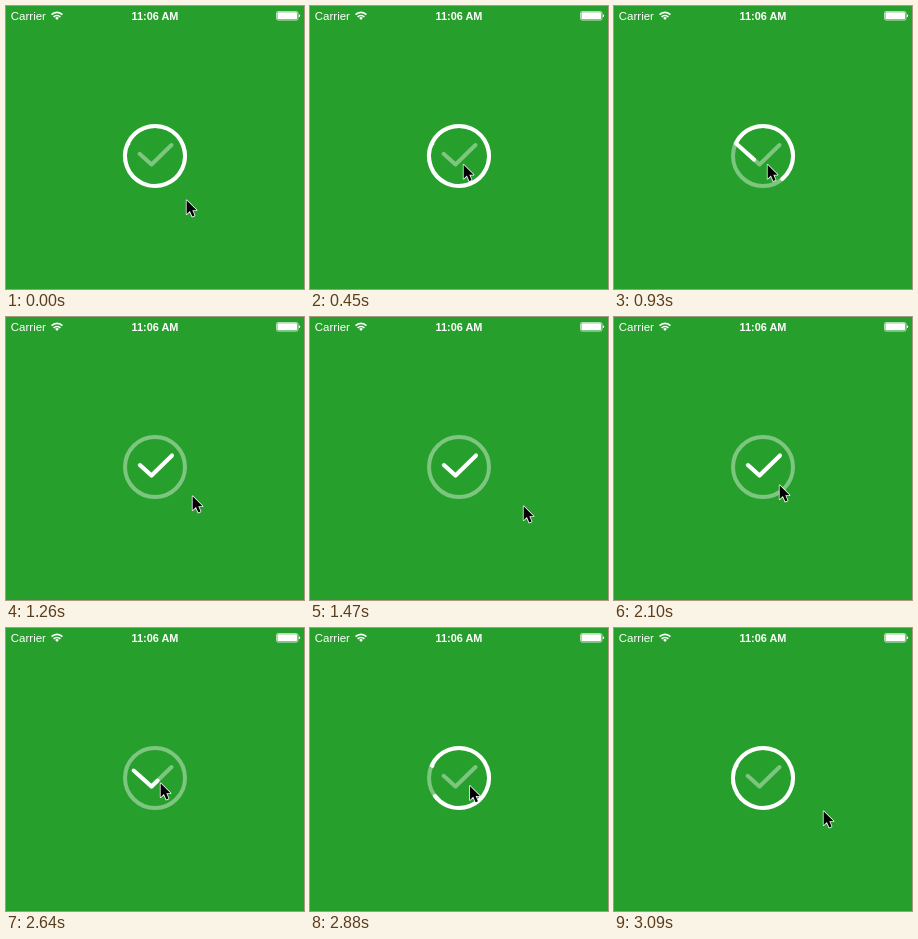
An HTML page that plays this animation: 298 px wide and 283 px high, repeating every 3.12 s.

```html
<!DOCTYPE html>
<html lang="en">
<head>
<meta charset="utf-8">
<title>Check button</title>
<style>
  html, body { margin: 0; width: 100%; height: 100%; overflow: hidden; background: #279f2c; }
  svg { display: block; width: 298px; height: 283px; }
  text { font-family: "Liberation Sans", Arial, sans-serif; fill: #fff; }
  .line { fill: none; stroke: #fff; stroke-width: 4; stroke-linecap: round; stroke-linejoin: round; }
  .track { opacity: .4; }
</style>
</head>
<body>
<svg viewBox="0 0 298 283">
  <rect width="298" height="283" fill="#279f2c"/>

  <text x="4.8" y="14" font-size="11.5">Carrier</text>
  <g fill="none" stroke="#fff" stroke-width="1.7">
    <path d="M45.6 8.7a7.6 7.6 0 0 1 10.8 0"/>
    <path d="M47.6 10.9a4.8 4.8 0 0 1 6.8 0"/>
    <path d="M49.1 12l1.9 2 1.9-2a2.7 2.7 0 0 0-3.8 0z" fill="#fff" stroke="none"/>
  </g>
  <text x="149" y="14" font-size="10.9" font-weight="bold" text-anchor="middle">11:06 AM</text>
  <rect x="270.5" y="5.5" width="21.5" height="8.6" rx="1.6" fill="none" stroke="#fff" stroke-width=".8" opacity=".8"/>
  <rect x="271.4" y="6.3" width="19.7" height="7" rx="1" fill="#fff"/>
  <path d="M292.8 8.3q1.4 .3 1.4 1.5t-1.4 1.5z" fill="#fff"/>

  <circle class="line track" cx="149" cy="150" r="30"/>
  <path class="line track" d="M133.6 147.8L145.5 158.5L165.5 139"/>
  <path class="line" id="stroke" d="M121.81 137.32A30 30 0 0 0 176.19 162.68A30 30 0 0 0 121.81 137.32L145.5 158.5L171.2 133.4"/>

  <path id="cursor" d="M.6 1.2V15.2L3.9 12.1L6.3 17.6L8.6 16.6L6.3 11.2H10.6Z"
        fill="#000" stroke="#fff" stroke-width="1.5" stroke-linejoin="round" paint-order="stroke"/>
</svg>
<script>
const LOOP = 3120, STEP = 30;
const stroke = document.getElementById("stroke");
const cursor = document.getElementById("cursor");

const clamp = (v, lo, hi) => Math.min(hi, Math.max(lo, v));
const mix = (a, b, u) => a + (b - a) * u;

const linear = u => u;
const easeIn = u => u ** 1.5;
const easeOut = u => 1 - (1 - u) ** 2;
const easeInOut = u => u * u * (3 - 2 * u);

function bezier(x1, y1, x2, y2) {
  const at = (a, b, s) => 3 * a * s * (1 - s) ** 2 + 3 * b * s * s * (1 - s) + s ** 3;
  return x => {
    if (x <= 0 || x >= 1) return clamp(x, 0, 1);
    let lo = 0, hi = 1;
    for (let i = 0; i < 24; i++) {
      const mid = (lo + hi) / 2;
      if (at(x1, x2, mid) < x) lo = mid; else hi = mid;
    }
    return at(y1, y2, lo);
  };
}
const anticipate = bezier(.25, -.4, .5, 1);

// Visible span of the stroke in each state, as lengths along its path.
const ring = { start: 0, end: 188.5 };
const check = { start: 204.3, end: 248.2 };
const pathLength = 256;

// Time, x, y, easing towards this point.
const moves = [
  [0, 180, 193, linear],
  [450, 153, 157.5, easeInOut],
  [1080, 153, 157.5, linear],
  [1260, 186, 178, easeIn],
  [1440, 213, 188, easeOut],
  [1830, 213, 188, linear],
  [2100, 165, 167, easeInOut],
  [2430, 154, 154, easeOut],
  [2830, 154, 154, linear],
  [3090, 209, 182, easeInOut],
  [LOOP, 209, 182, linear]
];

function cursorAt(t) {
  const i = moves.findIndex(m => m[0] > t);
  const [t0, x0, y0] = moves[i - 1];
  const [t1, x1, y1, ease] = moves[i];
  const u = ease((t - t0) / (t1 - t0));
  return [mix(x0, x1, u), mix(y0, y1, u)];
}

function spanAt(t) {
  const closing = t > 2000;
  const [from, to] = closing ? [check, ring] : [ring, check];
  const begin = closing ? 2523 : 715;
  const progress = duration => anticipate((t - begin) / duration);
  return [
    mix(from.start, to.start, progress(500)),
    mix(from.end, to.end, progress(closing ? 293 : 500))
  ].map(v => clamp(v, 0, pathLength));
}

function draw(t) {
  const [start, end] = spanAt(t);
  stroke.setAttribute("stroke-dasharray", `${Math.max(0, end - start)} 999`);
  stroke.setAttribute("stroke-dashoffset", -start);
  cursor.setAttribute("transform", `translate(${cursorAt(t)})`);
}

const origin = performance.now();
function tick() {
  const t = (performance.now() - origin) % LOOP;
  draw(Math.floor(t / STEP) * STEP);
  requestAnimationFrame(tick);
}
tick();
</script>
</body>
</html>
```
